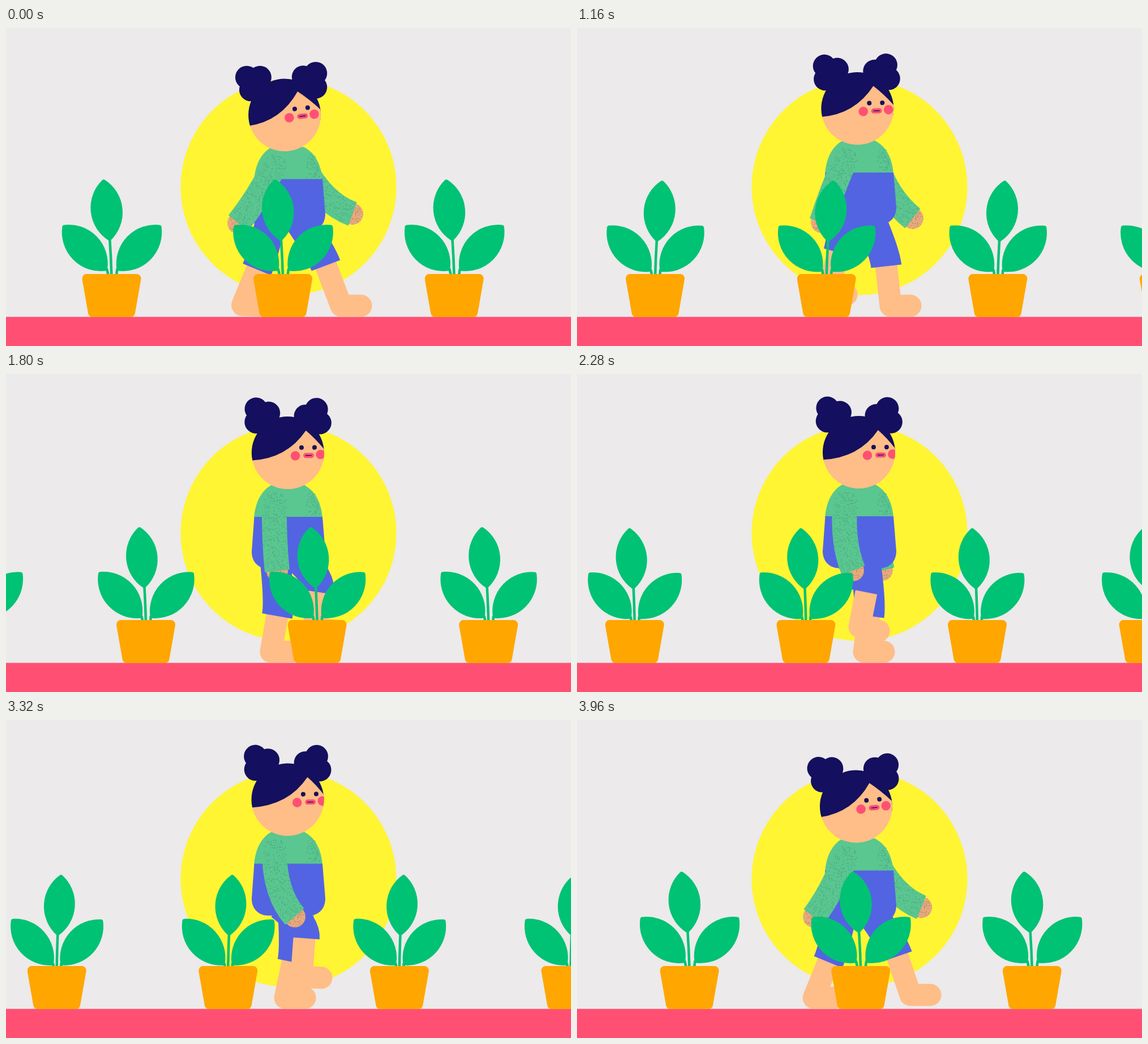
These frames come from a looping animation (998 by 561 pixels, 4 s). An HTML page with a canvas:

```html
<!DOCTYPE html>
<html lang="en">
<head>
<meta charset="utf-8">
<title>Walking past the plants</title>
<style>
  html, body { margin: 0; width: 100%; height: 100%; overflow: hidden; background: #eceaea; }
  canvas { display: block; }
</style>
</head>
<body>
<canvas id="stage" width="998" height="561"></canvas>
<script>
const ctx = document.getElementById('stage').getContext('2d');
const TAU = Math.PI * 2, DEG = Math.PI / 180;
const LOOP = 4000, STRIDE = 1000, STEP = 40, PLANT_GAP = 302.6;
const COLOR = {
  wall: '#eceaea', sun: '#fff533', floor: '#ff5074', leaf: '#00c274', pot: '#ffa600',
  skin: '#ffbd87', hand: '#e9aa7c', hair: '#140f5e', denim: '#5264e2', wool: '#5ac690',
  grain: 'rgba(35,75,80,.42)'
};

// Stride poses: time, knee x y, heel x y, foot angle
const LEG = [
  [0, 565, 419, 592, 490, 0], [150, 548, 420, 557, 490, 0], [300, 511, 427, 500, 490, 0],
  [480, 475, 427, 449, 490, 0], [645, 491, 398, 475, 452, 34], [780, 543, 385, 531, 446, 12],
  [820, 559, 385, 554, 453, 3], [960, 566, 417, 589, 485, 0]
];
// Swing poses: time, cuff x y, forearm angle from vertical
const ARM = [
  [0, 410, 328, -39], [160, 432, 338, -18], [280, 488, 346, 22], [320, 510, 344, 41],
  [500, 561, 312, 70], [650, 544, 330, 54], [800, 479, 346, 6], [960, 418, 332, -37]
];

function random(seed) {
  return () => {
    seed = (seed * 16807) % 2147483647;
    return seed / 2147483647;
  };
}
function specks(count, seed) {
  const next = random(seed);
  return Array.from({ length: count }, () => [next(), next()]);
}
const sleeveGrain = specks(380, 71), handGrain = specks(110, 29), chestGrain = specks(70, 53);

// Periodic monotone cubic through the poses
function pose(keys, time) {
  const n = keys.length, p = ((time % STRIDE) + STRIDE) % STRIDE;
  const at = i => {
    const turn = Math.floor(i / n), key = keys[i - turn * n];
    return [key[0] + turn * STRIDE, ...key.slice(1)];
  };
  let i = n - 1;
  while (keys[i][0] > p) i--;
  const [a, b, c, d] = [at(i - 1), at(i), at(i + 1), at(i + 2)];
  const span = c[0] - b[0], k = (p - b[0]) / span;
  const tangent = (u, v) => u * v <= 0 ? 0 : 2 * u * v / (u + v);
  return b.slice(1).map((value, j) => {
    j++;
    const slope = (u, v) => (v[j] - u[j]) / (v[0] - u[0]);
    const s = slope(b, c);
    const m0 = tangent(slope(a, b), s) * span, m1 = tangent(s, slope(c, d)) * span;
    return value * (1 + 2 * k) * (1 - k) ** 2 + m0 * k * (1 - k) ** 2
      + c[j] * k * k * (3 - 2 * k) + m1 * k * k * (k - 1);
  });
}

// 1 when the body is lowest (feet apart), 0 when highest (feet passing)
function lowness(time) {
  return (1 + Math.cos(time / 500 * TAU)) / 2;
}

function fill(path, color) {
  ctx.fillStyle = color;
  ctx.fill(new Path2D(path));
}
function line(path, color, width, cap = 'butt') {
  ctx.strokeStyle = color;
  ctx.lineWidth = width;
  ctx.lineCap = cap;
  ctx.lineJoin = 'round';
  ctx.stroke(new Path2D(path));
}
function disc(x, y, r, color) {
  ctx.fillStyle = color;
  ctx.beginPath();
  ctx.arc(x, y, r, 0, TAU);
  ctx.fill();
}
function group(x, y, angle, draw) {
  ctx.save();
  ctx.translate(x, y);
  ctx.rotate(angle);
  draw();
  ctx.restore();
}
function speck(x, y) {
  ctx.fillRect(x - .5, y - .5, 1, 1);
}

function leaf(tipX, tipY, baseX, baseY, radius) {
  const inset = 4, length = Math.hypot(baseX - tipX, baseY - tipY);
  const dx = (baseX - tipX) / length * inset, dy = (baseY - tipY) / length * inset;
  const tip = `${tipX + dx} ${tipY + dy}`, base = `${baseX - dx} ${baseY - dy}`;
  const arc = `A${radius} ${radius} 0 0 1 `;
  const shape = `M${tip}${arc}${base}${arc}${tip}Z`;
  fill(shape, COLOR.leaf);
  line(shape, COLOR.leaf, inset * 2);
}

function plant(x, sway) {
  const sag = 1 - sway * sway, baseY = 427.5 + 6 * sag;
  const left = -8.5 + 2.5 * sag, right = 10 - 3.5 * sag;
  const topX = -3.3 * sway, topY = 375 + 7 * sag;
  group(x, 0, 0, () => {
    line(`M${topX} ${topY - 4}Q${topX * .3} 405 0 440`, COLOR.leaf, 4.5);
    line(`M${left} ${baseY - 3}L-5 440M${right} ${baseY - 3}L8 440`, COLOR.leaf, 4.5);
    leaf(-14.3 * sway, 267.5 + 8 * sag, topX, topY, 64);
    leaf(-86 + 9 * sag, 348.5 + 4.5 * sag, left, baseY, 65);
    leaf(87 - 9 * sag, 348.5 + 6 * sag, right, baseY, 65);
    const pot = 'M-44 442H44L33.5 502H-33.5Z';
    fill(pot, COLOR.pot);
    line(pot, COLOR.pot, 16);
  });
}

function leg(time, shift, bob) {
  const [kneeX, kneeY, heelX, heelY, angle] = pose(LEG, time);
  const length = Math.hypot(heelX - kneeX, heelY - kneeY);
  const dx = (heelX - kneeX) / length, dy = (heelY - kneeY) / length;
  const toeX = heelX + 35 * Math.cos(angle * DEG), toeY = heelY + 35 * Math.sin(angle * DEG);
  const hipX = 509 + (kneeX - 520) * .2;
  group(shift, 0, 0, () => {
    line(`M${kneeX - dx * 10} ${kneeY - dy * 10}L${heelX} ${heelY}L${toeX} ${toeY}`, COLOR.skin, 39, 'round');
    line(`M${hipX} ${323 + bob}Q${kneeX - dx * 26} ${kneeY - dy * 26} ${kneeX} ${kneeY}`, COLOR.denim, 54);
  });
}

function arm(time, shift, bob) {
  const [cuffX, cuffY, angle] = pose(ARM, time);
  const dx = Math.sin(angle * DEG), dy = Math.cos(angle * DEG);
  const from = [474, 227], bend = [cuffX - dx * 55, cuffY - dy * 55], to = [cuffX, cuffY];
  group(shift, bob, 0, () => {
    disc(cuffX, cuffY, 19, COLOR.hand);
    ctx.fillStyle = COLOR.grain;
    for (const [a, b] of handGrain) {
      const r = 18.5 * Math.sqrt(a);
      speck(cuffX + r * Math.cos(b * TAU), cuffY + r * Math.sin(b * TAU));
    }
    disc(...from, 22, COLOR.wool);
    line(`M${from}Q${bend} ${to}`, COLOR.wool, 44);
    ctx.fillStyle = COLOR.grain;
    for (const [a, b] of sleeveGrain) {
      const k = a ** 1.35 * 1.12 - .12, j = Math.max(k, 0), i = 1 - j;
      const point = n => i * i * from[n] + 2 * i * j * bend[n] + j * j * to[n];
      const tx = i * (bend[0] - from[0]) + j * (to[0] - bend[0]);
      const ty = i * (bend[1] - from[1]) + j * (to[1] - bend[1]);
      const size = Math.hypot(tx, ty), back = Math.min(k, 0) * 150;
      const side = (b * 2 - 1) * Math.sqrt(Math.max(0, 441 - back * back));
      speck(point(0) + (tx * back - ty * side) / size, point(1) + (ty * back + tx * side) / size);
    }
  });
}

function torso(bob) {
  group(0, bob, 0, () => {
    fill('M438 252C441 222 452 203 470 194H526C545 204 556 222 559 252Z', COLOR.wool);
    ctx.fillStyle = COLOR.grain;
    for (const [a, b] of chestGrain) speck(530 + 26 * Math.sqrt(a) * (.6 + .4 * b), 207 + 42 * b);
    fill('M438.5 250.5H559L564 312C564 330 552 342 535 342H463C446 342 434 330 434 312Z', COLOR.denim);
  });
}

function bun(x, y, angle, lobes) {
  group(x, y, angle * DEG, () => {
    for (const [dx, dy] of [[0, 0], ...lobes]) disc(dx, dy, 20.2, COLOR.hair);
  });
}

function head(time, bob) {
  const low = lowness(time), lead = lowness(time + 25);
  const x = 498 - 6 * lowness(time - 25), y = 137.5 + bob;
  const turn = 14.5 - 6.8 * Math.cos((time - 20) / STRIDE * TAU);
  bun(x - 55 - 12 * low, y - 78.5 + 12 * low, 20 * (1 - low), [[23.5, 0], [7, 22]]);
  bun(x + 49.5 + 5.5 * lead, y - 77.5 + 4 * lead, -16 * (1 - low), [[-22, 6.5], [0, 24.5]]);
  group(x, y, -5.5 * low * DEG, () => {
    ctx.beginPath();
    ctx.arc(0, 0, 64, 0, TAU);
    ctx.clip();
    const peak = turn + 19, edgeY = -2.3 - (turn - 8) * .4;
    fill('M-70-70H70V14H-70Z', COLOR.hair);
    fill(`M-70 14L-64 13Q${peak - 34} 10 ${peak} -39Q${(peak + 66) / 2 + 1} ${(edgeY - 39) / 2 - 2} 66 ${edgeY + 1}V70H-70Z`, COLOR.skin);
    disc(turn, 5.5, 8.3, COLOR.floor);
    disc(turn + 44.5, 3.5, 8.3, COLOR.floor);
    disc(turn + 11, -9, 4, COLOR.hair);
    disc(turn + 34, -9, 4, COLOR.hair);
    const mouth = turn + 23.5;
    line(`M${mouth - 5} 5H${mouth + 5}`, COLOR.floor, 9, 'round');
    line(`M${mouth - 5} 5H${mouth + 5}`, COLOR.hair, 1.4, 'round');
  });
}

function render(time) {
  const bob = 16 * lowness(time);
  ctx.fillStyle = COLOR.wall;
  ctx.fillRect(0, 0, 998, 561);
  disc(499, 280.5, 190.5, COLOR.sun);
  ctx.fillStyle = COLOR.floor;
  ctx.fillRect(0, 509.6, 998, 52);

  arm(time + 500, 51, bob);
  leg(time, 0, bob);
  leg(time + 500, -32, bob);
  torso(bob);
  arm(time, 0, bob);
  head(time, bob);

  const sway = Math.cos(time / 2000 * TAU);
  const first = 186.5 - (time / STRIDE % 1) * PLANT_GAP;
  for (let i = 0; i < 5; i++) plant(first + i * PLANT_GAP, sway);
}

function tick() {
  render(Math.floor(performance.now() % LOOP / STEP) * STEP);
  requestAnimationFrame(tick);
}
tick();
</script>
</body>
</html>
```
